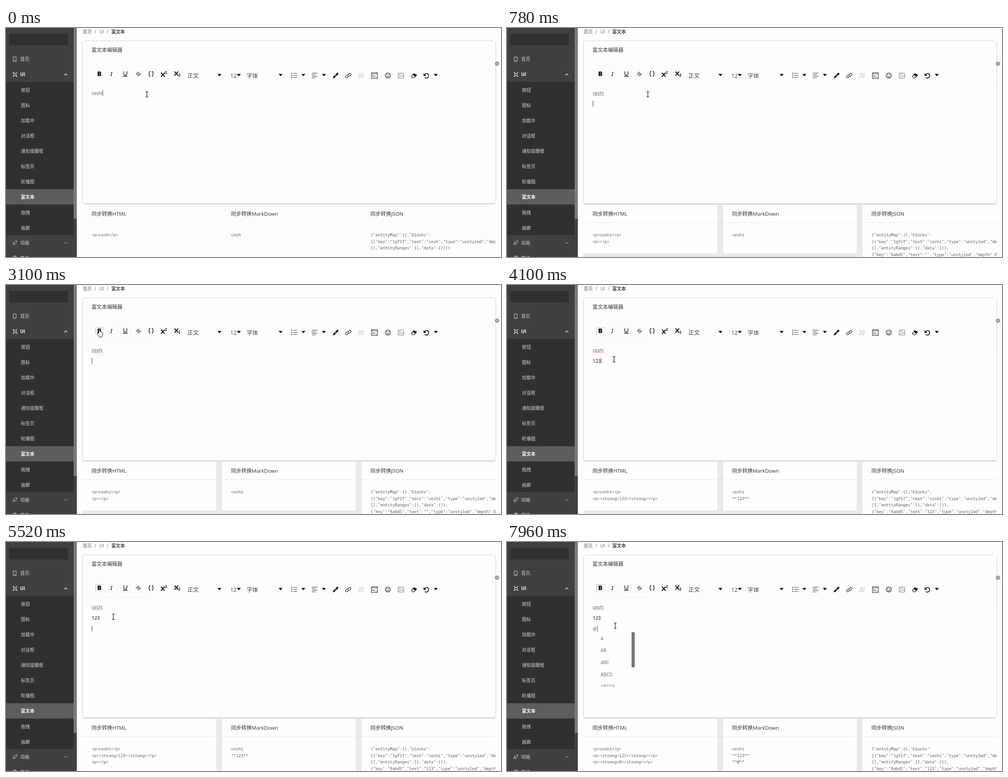
These frames come from a looping animation (1097 by 510 pixels, 8000 ms). An HTML page:

```html
<!DOCTYPE html>
<html lang="zh-CN">
<head>
<meta charset="utf-8">
<title>富文本</title>
<style>
html, body { margin: 0; width: 100%; height: 100%; overflow: hidden; background: #fdfdfd; }
svg { display: block; width: 1097px; height: 510px; }
text { font-family: "Open Sans", "Noto Sans CJK SC", "Noto Sans CJK", sans-serif; white-space: pre; }
.mono { font-family: "Noto Sans Mono", monospace; letter-spacing: -.35px; }
.serif { font-family: "Noto Serif", serif; }
.line { fill: none; stroke-linecap: round; stroke-linejoin: round; }
</style>
</head>
<body>
<svg viewBox="0 0 1097 510">
  <defs>
    <clipPath id="content"><path d="M157 0H1085V510H157z"/></clipPath>
    <clipPath id="popup"><path d="M190 201H284V322H190z"/></clipPath>
  </defs>
  <g id="backdrop"></g>
  <g id="page"></g>
  <g id="live"></g>
</svg>
<script>
const LOOP = 8000;
const $ = id => document.getElementById(id);
const escapeText = s => s.replace(/&/g, '&amp;').replace(/</g, '&lt;');
const text = (x, y, s, size, fill = '#333', extra = '') =>
  `<text x="${x}" y="${y}" font-size="${size}" fill="${fill}" ${extra}>${escapeText(s)}</text>`;
const rect = (x, y, w, h, fill, extra = '') =>
  `<rect x="${x}" y="${y}" width="${w}" height="${h}" fill="${fill}" ${extra}/>`;
const line = (d, color = '#222', width = 1) =>
  `<path class="line" d="${d}" stroke="${color}" stroke-width="${width}"/>`;
const shape = (d, fill = '#111', extra = '') => `<path d="${d}" fill="${fill}" ${extra}/>`;
const circle = (x, y, r, color = '#222', width = 1) =>
  `<circle cx="${x}" cy="${y}" r="${r}" fill="none" stroke="${color}" stroke-width="${width}"/>`;
const move = (x, y, s) => `<g transform="translate(${x} ${y})">${s}</g>`;

// Latest value in [[time, value], ...] that has started
const at = (t, steps) => steps.reduce((v, [start, next]) => t >= start ? next : v, null);

function sidebar() {
  const items = ['按钮', '图标', '加载中', '对话框', '通知提醒框', '标签页', '轮播图', '富文本', '拖拽', '画廊'];
  const gray = '#d4d4d4', bold = 'font-weight="700"';
  return rect(0, 0, 157, 510, '#404040') +
    rect(0, 120, 150, 341, '#303030') + rect(0, 359, 150, 34, '#5d5d5d') +
    rect(150, 0, 7, 425, '#7a7a7a') + rect(150, 425, 7, 85, '#414141') +
    rect(7, 13, 130, 26, '#303030', 'rx="4"') +
    text(31.5, 73, '首页', 10, gray) + text(31.5, 107, 'UI', 10, '#fff', bold) +
    items.map((s, i) => text(33, 141.5 + i * 34.13, s, 10, i === 7 ? '#fff' : gray, i === 7 ? bold : '')).join('') +
    text(31.5, 482, '动画', 10, gray) + text(31.5, 516, '高级', 10, gray) +
    line('M16.5 64.5H22.5V74.5H16.5zM19 72.5H20', gray) +
    line('M17 101V99H15M23 99H25M15 108H17V106M23 106V108H25M17.5 101H22.5V106H17.5z', '#fff', 1.1) +
    line('M129.5 105L132.5 102L135.5 105', '#fff', 1.1) +
    line('M129.5 477L132.5 480L135.5 477', gray) +
    line('M17 478Q19 474 24 474Q24 479 20 481zM17 478L15 479L17 481M20 481L19 483M15 483L17 481', gray) +
    circle(19.5, 512, 4, gray, 1.5);
}

function toolbar() {
  const arrow = x => shape(`M${x - 4.5} 102.2H${x + 4.5}L${x} 107.5z`);
  const rows = [101, 105.5, 110];
  const heavy = 'font-weight="700"';
  const label = (x, s) => text(x, 110.5, s, 12.5, '#444');
  const chain = 'M-.5 -1.5L2 -4Q4 -6 5.5 -4.2Q7 -2.5 5 -.7L3 1.2Q1.5 2.2 0 1M.5 1.5L-2 4Q-4 6 -5.5 4.2Q-7 2.5 -5 .7L-3 -1.2Q-1.5 -2.2 0 -1';
  return text(202, 107, 'B', 14.5, '#111', 'font-weight="800"') +
    text(231, 106.5, 'I', 13, '#111', 'class="serif" font-style="italic"') +
    line('M261 97V101.5Q261 105 264.5 105Q268 105 268 101.5V97M260 107.5H269', '#111', 1.3) +
    text(289.5, 107, 'S', 13.5, '#111') + line('M288 102.5H299', '#111', 1.1) +
    line('M319.5 97H318.5Q317.5 97 317.5 98V101L316.5 102L317.5 103V106Q317.5 107 318.5 107H319.5M323.5 97H324.5Q325.5 97 325.5 98V101L326.5 102L325.5 103V106Q325.5 107 324.5 107H323.5', '#111', 1.3) +
    line('M344 100L351 108M351 100L344 108', '#111', 2) + text(352, 102, '2', 8, '#111', heavy) +
    line('M374 97.5L381 105.5M381 97.5L374 105.5', '#111', 2) + text(382, 107.5, '2', 8, '#111', heavy) +
    label(402, '正文') + label(497, '12') + label(533.5, '字体') +
    [473, 516, 608.5, 659, 704.5, 952.5].map(arrow).join('') +
    rows.map(y => circle(633.2, y, 1, '#333', .9) + line(`M637 ${y}H645`, '#333')).join('') +
    line('M678 100.5H690M678 104H686M678 107.5H690M678 111H686', '#333') +
    shape('M724 112L725.5 108L729 105L731.5 107.5L728 111zM729.5 104L733.5 100Q735.5 99 736.5 101Q737 102 736 103L732.2 107z') +
    move(758.5, 106, line(chain, '#222', 1.2)) +
    move(787, 106, line(chain + 'M-5 -4L-3 -3M5 4L3 3M-3 -6L-2 -4M3 6L2 4', '#c6c6c6', 1.1)) +
    line('M810 99.5H823V112.5H810zM810 102H823', '#222', 1.1) +
    line('M813.5 106V109.5M812 107H815M816 110L818 105.5M819 110H821', '#333', .9) +
    circle(846.2, 105.8, 5.7, '#222', 1.2) + line('M843.4 107.3Q846.2 111 849 107.3', '#222', 1.2) +
    shape('M843.4 103.2h1.8v1.8h-1.8zM847.4 103.2h1.8v1.8h-1.8z') +
    line('M869.5 100.5H881.5V111.5H869.5zM870 110L873.5 106L876 108.5L878.5 105L881 108.5', '#777') + circle(873, 103.3, 1, '#777') +
    line('M898.5 108L904 101.5L910 104.5L904.5 111H900.5z', '#111', 1.2) + shape('M901.5 104.5L904 101.5L910 104.5L907 108z') +
    line('M928 104Q931 100 934.5 102Q938 105 935.8 109Q933 113 928.5 110.8', '#111', 1.7) + shape('M925.5 100.5V106.5H931.5z');
}

function page() {
  const crumb = '#666';
  const gearTeeth = Array.from({ length: 8 }, (_, i) => {
    const a = i * Math.PI / 4, c = Math.cos(a), s = Math.sin(a);
    return `M${1088.2 + c * 3.6} ${79.5 + s * 3.6}L${1088.2 + c * 4.5} ${79.5 + s * 4.5}`;
  }).join('');
  return sidebar() +
    text(170, 12, '首页', 10, crumb) + text(196, 12, '/', 10, crumb) + text(207, 12, 'UI', 10, crumb) +
    text(223.5, 12, '/', 10, crumb) + text(233.5, 12, '富文本', 10, '#444', 'font-weight="700"') +
    line('M174 28.5H1080', '#d4d4d4') +
    line('M172 30.5Q169.5 31 169.5 34V387Q169.5 391 174 391.5M1083 30.5Q1085.5 31 1085.5 34V387Q1085.5 391 1081 391.5', '#cfcfcf') +
    line('M173 391.5H1082', '#c2c2c2', 1.5) +
    text(189.5, 53, '富文本编辑器', 11.4) +
    rect(1086, 64, 11, 32, '#fefefe') + line('M1085.5 64.5H1087M1085.5 95.5H1087', '#ddd') +
    circle(1088.2, 79.5, 3.6, '#444') + circle(1088.2, 79.5, 1.4, '#444') + line(gearTeeth, '#444') +
    toolbar() +
    text(189.5, 418, '同步转换HTML', 11.5) + text(498.5, 418, '同步转换MarkDown', 11.5) +
    text(807.5, 418, '同步转换JSON', 11.5);
}

function cards(t) {
  if (t < 780) return '';
  const tall = t >= 5520;
  const card = (x, w, h) => rect(x, 394, w, h, '#fefefe', 'rx="2"') + line(`M${x} 433.5H${x + w}`, '#e8e8e8');
  return rect(169, 393, 916, 117, '#e9e9e9') +
    card(169, 297, tall ? 118 : 108) + card(479, 296, tall ? 118 : 108) + card(788, 297, 118);
}

const backdrop = t => (t >= 660 ? rect(171, 150, 913, 240, '#fefefe') : '') + cards(t);

const block = (key, s) => `{"key":"${key}","text":"${s}","type":"unstyled","depth":0,"inline`;
const secondLine = t => at(t, [[0, ''], [3680, '1'], [3840, '12'], [3970, '123']]);

function panels(t) {
  const first = t < 120 ? 'cesh' : 'ceshi';
  const second = secondLine(t);
  const strong = s => s && `<strong>${s}</strong>`;
  const html = [`<p>${first}</p>`], md = [first];
  const json = ['{"entityMap":{},"blocks":', '[' + block('1gflf', first), '[],"entityRanges":[],"data":{}}' + (t < 780 ? ']}' : ',')];
  if (t >= 780) {
    html.push(`<p>${strong(second)}</p>`);
    md.push(second && `**${second}**`);
    json.push(block('8abd5', second));
  }
  if (t >= 5520) html.push(`<p>${t >= 7570 ? strong('@') : ''}</p>`);
  if (t >= 7570) md.push('**@**');
  const column = (x, lines) => lines.map((s, i) =>
    text(x, 464 + i * 14.7, s, 9.5, '#606060', 'class="mono"')).join('');
  return `<g clip-path="url(#content)">${column(189.5, html)}${column(499, md)}${column(808, json)}</g>`;
}

function popup() {
  const items = ['A', 'AB', 'ABC', 'ABCD', 'ABCDE'];
  return `<g clip-path="url(#popup)">${rect(190, 201, 94, 121, '#fefefe')}${
    items.map((s, i) => text(207.5, 218.7 + i * 26.75, s, 10, '#666')).join('')}${rect(276, 201, 7, 78, '#777')}</g>`;
}

function editor(t) {
  const wave = 'M190.5 151' + 'l1.5 -1.5l1.5 1.5'.repeat(8);
  const caret = at(t, [[0, [214, 138]], [510, null], [660, [190, 162]], [1210, null], [1770, [190, 162]],
    [2290, null], [2830, [190, 162]], [3680, [196, 162]], [3840, [202, 162]], [3970, [208, 162]],
    [4350, null], [4840, [208, 162]], [5400, [190, 187]], [5990, null], [6420, [190, 187]],
    [7010, null], [7570, [200, 187]]]);
  return text(190, t < 660 ? 148.5 : 149, 'ceshi', 10, '#555') + (t >= 660 ? line(wave, '#f05050', .8) : '') +
    text(190, 173, secondLine(t), 10.4, '#444', 'font-weight="600"') +
    (t >= 7570 ? text(190, 197, '@', 10, '#555') + popup() : '') +
    (caret ? rect(...caret, 1, 13, '#444') : '');
}

// Button outlines show up once the pointer has passed over them
function buttons(t) {
  const box = (x, w, state) => {
    const right = x + w;
    return line(`M${x} 94.5H${right}V109.5H${x}z`, '#f1f1f1') +
      (state === 'over' ? line(`M${right} 95V109.5H${x + 1}`, '#bfbdbd') : '') +
      (state === 'pressed' ? line(`M${x} 109V94.5H${right}`, '#bfbdbd') : '');
  };
  return (t >= 2590 ? line('M190 123.5H315', '#f0f0f0') + box(254.5, 21, t < 2710 && 'over') : '') +
    (t >= 2710 ? box(225.5, 20, t < 2980 && 'over') : '') +
    (t >= 2980 ? box(198.5, 18, t < 3100 ? 'over' : 'pressed') : '');
}

const pointers = {
  beam: line('M-2.5 -6H-1Q0 -6 0 -5Q0 -6 1 -6H2.5M0 -5V5M-2.5 6H-1Q0 6 0 5Q0 6 1 6H2.5', '#111', 1.2),
  arrow: shape('M.5 .5V13L3.4 10.3L5.4 15L7.4 14.1L5.4 9.6H9.5z', '#fff', 'stroke="#111"'),
  hand: shape('M4 11V2Q4 .7 5.2 .7Q6.4 .7 6.4 2V7Q7.5 6 8.6 7.3Q10 6.6 10.8 8Q12.6 7.6 12.6 9.6V13Q12.6 15.5 11.3 17V19H5V17.2L1 12Q.2 10.6 1.2 10Q2 9.6 2.8 10.4z', '#fff', 'stroke="#111" stroke-linejoin="round"')
};

function pointer(t) {
  const [kind, x, y] = at(t, [[0, ['beam', 312.2, 147.5]], [2290, ['beam', 311.2, 146.5]], [2450, ['arrow', 271, 108]],
    [2590, ['hand', 253, 105]], [2710, ['hand', 243, 105]], [2830, ['hand', 234, 104]], [2980, ['hand', 208, 99]],
    [3100, ['hand', 201.5, 97]], [3370, ['arrow', 218, 136]], [3530, ['beam', 228, 159.5]],
    [3680, ['beam', 231.2, 160]], [3840, ['beam', 234.2, 163]], [4100, ['beam', 237, 165.5]],
    [4350, ['beam', 237.8, 166.5]], [7960, ['beam', 240, 186.5]]]);
  return move(x, y, pointers[kind]);
}

const shown = {};
function put(id, markup) {
  if (shown[id] !== markup) $(id).innerHTML = shown[id] = markup;
}

function draw() {
  const t = performance.now() % LOOP;
  put('backdrop', backdrop(t));
  put('live', panels(t) + buttons(t) + editor(t) + pointer(t));
  requestAnimationFrame(draw);
}

put('page', page());
draw();
</script>
</body>
</html>
```
